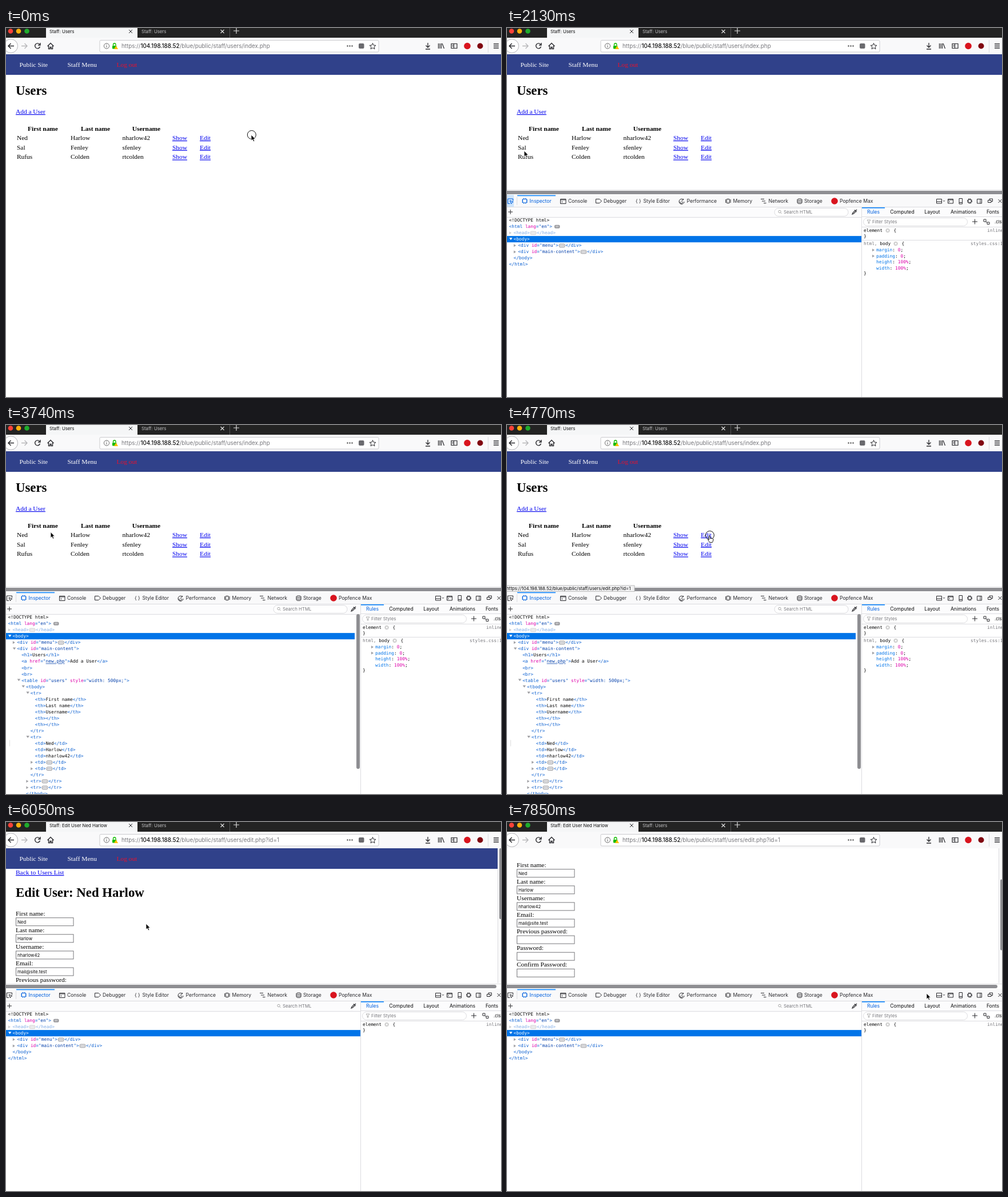
An HTML page that plays this animation: 866 px wide and 646 px high, repeating every 7.99 s.

```html
<!DOCTYPE html>
<html lang="en">
<head>
<meta charset="utf-8">
<title>Staff: Users</title>
<style>
  html, body { margin: 0; width: 100%; height: 100%; overflow: hidden; background: #fff; }
  svg { display: block; width: 866px; height: 646px; }
  text { white-space: pre; font: 8.6px Inter, "Open Sans", sans-serif; fill: #0c0c0d; }
  .s { font-size: 7.8px; }
  .grey { fill: #77777c; }
  .mid { text-anchor: middle; }
  .url { font-size: 9.85px; fill: #77777c; }
  .info { font-size: 9.4px; fill: #38383d; }
  .p { font: 11.4px "Liberation Serif", serif; fill: #000; }
  .b { font-weight: bold; }
  .h { font: bold 22.8px "Liberation Serif", serif; fill: #000; }
  .a { fill: #00e; text-decoration: underline; }
  .m { font: 7.83px "DejaVu Sans Mono", monospace; }
  .tab text { fill: currentColor; }
  .i { fill: none; }
  .i:not([stroke]) { stroke: currentColor; }
</style>
</head>
<body>
<svg id="stage" viewBox="0 0 866 646" color="#2a2a2e"></svg>
<script>
const T = (x, y, s, cls = '', more = '') => `<text x="${x}" y="${y}" class="${cls}" ${more}>${s}</text>`;
const R = (x, y, w, h, fill, more = '') => `<rect x="${x}" y="${y}" width="${w}" height="${h}" fill="${fill}" ${more}/>`;
const C = (x, y, r, fill, more = '') => `<circle cx="${x}" cy="${y}" r="${r}" fill="${fill}" ${more}/>`;
const P = (d, more = '') => `<path class="i" d="${d}" ${more}/>`;
const G = (id, s, more = '') => `<g id="${id}" ${more}>${s}</g>`;
const span = (fill, s, more = '') => `<tspan fill="${fill}" ${more}>${s}</tspan>`;
const BLUE = '#0074e8', PINK = '#dd00a9', LINE = '#dcdce0';
const CHAR = 4.714;

const users = [['Ned', 'Harlow', 'nharlow42'], ['Sal', 'Fenley', 'sfenley'], ['Rufus', 'Colden', 'rtcolden']];
const [first, last, login] = users[0];
const host = 'https://' + span('#0c0c0d', '104.198.188.52', 'font-weight="500"') + '/blue/public/staff/users/';

// browser window
const chrome = () =>
  R(0, 0, 866, 17, '#232323') + R(70, 0, 160, 17, '#f5f6f7') + R(0, 17, 866, 29, '#f9f9fa') +
  C(8, 5.5, 4.3, '#fc4138') + C(22, 5.5, 4.3, '#fdb00c') + C(36.5, 5.5, 4.3, '#1fac2c') +
  `<text id="title" x="76" y="9" class="s"></text>` + T(237, 9, 'Staff: Users', 's', 'style="fill:#c4c4c6"') +
  P('M215 3l6 6m0-6l-6 6') + P('M375.500 3l6 6m0-6l-6 6M403 0v10m-5-5h10', 'stroke="#ddd" stroke-width="1.200"') + P('M391.500 0v17', 'stroke="#555"') +
  C(8.5, 31.5, 12, '#fff', 'stroke="#b4b4b8"') + P('M14 31.500H4m4.500-4.500L4 31.500l4.500 4.500', 'stroke-width="1.500"') +
  P('M27 31.500h10m-4.500-4.500l4.500 4.500l-4.500 4.500', 'stroke="#b6b6b8" stroke-width="1.300"') +
  G('reload', P('M59 29a4.500 4.500 0 1 0 .5 3.500M60 26v4h-4', 'stroke-width="1.400"')) +
  G('stop', P('M51 27l8 8m0-8l-8 8', 'stroke-width="1.400"')) +
  P('M72.500 32l5.500-5.500l5.500 5.500M74.500 31v5.500h2.500v-3h2v3h2.500V31', 'stroke-width="1.400"') +
  R(164, 21.5, 488, 20.5, '#fff', 'rx="2" stroke="#cbcbce"') +
  C(176, 31.5, 4.6, 'none', 'stroke="#666"') + P('M176 30.500v3.500m0-5.500v1', 'stroke="#666"') +
  R(186, 31, 7.5, 5.5, '#12bc00', 'rx="1"') + P('M187.500 31v-2a2.200 2.200 0 0 1 4.500 0v2', 'stroke="#12bc00" stroke-width="1.300"') +
  `<path d="M192.500 31l3.500 6h-7z" fill="#ffbf00"/>` +
  `<text id="url" x="202" y="35" class="url"></text>` +
  [597.5, 601.5, 605.5].map(x => C(x, 31.5, 1.2, '#555')).join('') + R(617, 27, 9.5, 9, '#6a6a6e', 'rx="2"') +
  P('M641.500 26.500l1.500 3.600l4 .3l-3 2.600l1 3.900l-3.500-2.100l-3.500 2.100l1-3.900l-3-2.600l4-.3z') +
  P('M738 26v8m-3.500-3.500L738 34l3.500-3.500M734 37h8', 'stroke-width="1.300"') +
  P('M756.500 27v9m2.500-9v9m2.500-9v9m1.500-9l3.500 9', 'stroke-width="1.200"') +
  P('M779 27.500h10v8h-10zm4.500 0v8M780.500 30h2m-2 2h2', 'stroke-width="1.200"') +
  C(807, 31.5, 5.8, '#d9141e') + C(829.5, 31.5, 5, '#800610') +
  P('M843.500 21v22', `stroke="${LINE}"`) + P('M853 28h9m-9 3.500h9m-9 3.500h9', 'stroke-width="1.300"');

const menu = R(0, 46, 866, 36, '#30418a') +
  [[23.5, 'Public Site', '#fff'], [107.5, 'Staff Menu', '#fff'], [193.5, 'Log out', '#e8112d']]
    .map(([x, s, c]) => T(x, 68, s, 'p', `style="fill:${c}"`)).join('');

const listPage = () => menu + T(17, 117, 'Users', 'h') + T(17, 150, 'Add a User', 'p a') +
  [[64.5, 'First name'], [156.5, 'Last name'], [245.5, 'Username']].map(([x, s]) => T(x, 179.5, s, 'p b mid')).join('') +
  users.map((u, i) => [...u, 'Show', 'Edit'].map((s, j) =>
    T([19, 113, 203.5, 291, 339][j], 196 + i * 16.7, s, j > 2 ? 'p a' : 'p')).join('')).join('');

const editPage = () => menu + T(17, 92, 'Back to Users List', 'p a') + T(17, 131, `Edit User: ${first} ${last}`, 'h') +
  [['First name', first], ['Last name', last], ['Username', login], ['Email', 'mail@site.test'],
   ['Previous password', ''], ['Password', ''], ['Confirm Password', '']].map(([k, v], i) => {
    const y = 163.7 + i * 29.1;
    return T(17, y, k + ':', 'p') + R(17.5, y + 4, 100.5, 14, '#fff', 'stroke="#77777b"') + T(20, y + 14, v, 's');
  }).join('');

// developer tools
const tab = (x, s, icon, id = '') => `<g id="${id}" class="tab">${icon}${T(x, 306, s)}</g>`;
const toolbar = () =>
  R(0, 282, 866, 364, '#fff') + P('M0 283.500H866', `stroke="${LINE}"`) + R(0, 285, 0, 6, '#8e8e92', 'id="bar" rx="3"') +
  R(0, 292, 866, 21.5, '#f9f9fa') + R(18, 292, 67.5, 21, '#dedee1', 'id="hover"') + P('M0 313.500H866M17.500 296v14', `stroke="${LINE}"`) +
  G('picker', R(0, 292, 12, 21, '#cfe5fb', 'id="pickerBg"') + P('M5 307.500H1.500v-8.500h9v3.500M5 302l6 2.500l-2.500 1l-1 2.500z')) +
  R(0, 292.6, 67, 1.6, '#0a84ff', 'id="mark"') +
  tab(39.5, 'Inspector', P('M27.500 299.500h7v6.500h-7zM29.500 298v1.500m3-1.500v1.500m-3 6.500v1.500m3-1.500v1.500M26 301.500h1.500m-1.500 3h1.500m7-3h1.500m-1.500 3h1.500'), 'inspectorTab') +
  tab(107, 'Console', P('M93.500 299.500h9.500v8h-9.500zm0 1.500h9.500M95.500 303l1.500 1.500l-1.500 1.500')) +
  tab(169, 'Debugger', P('M155.500 299.500h6.500l3.500 3.500l-3.500 3.500h-6.500z')) +
  tab(238.5, 'Style Editor', T(225, 306, '{ }')) +
  tab(314.5, 'Performance', P('M309 301a4.500 4.500 0 1 0 1 3M305 304l4-5M303 304a2.200 2.200 0 1 0 4 0')) +
  tab(395.5, 'Memory', P('M384.500 299.500h4.500v7h-4.500zM382.500 300v6m8.500-6v6')) +
  tab(457.5, 'Network', P('M444 299.500h6m-4 3.500h6m-3 3.500h4.500'), 'networkTab') +
  tab(520, 'Storage', P('M508 300.500a4 1.500 0 0 1 8 0v5.500a4 1.500 0 0 1-8 0zm0 0a4 1.500 0 0 0 8 0m-8 3a4 1.500 0 0 0 8 0')) +
  tab(582, 'Popfence Max', C(573, 303, 5.8, '#d9141e')) +
  P('M751.500 299.500h9v7.500h-9zm0 4.500h9M763 302l1.500 1.500l1.500-1.500M771.500 299.500h9v7.500h-9zm0 1.500h9M773 302.500l1.500 1.500l-1.500 1.500M791 298.500h5.500v9.500H791zm0 7h5.500M822.500 299.500h8v7.500h-8zm5.500 0v7.500M841.500 301.500h5.500v4h-5.500zM844 301v-2h5.500v4.500H847M859.500 300l6 6m0-6l-6 6') +
  C(809.5, 303, 3.6, 'none', 'stroke="#3c3c40" stroke-width="1.800" stroke-dasharray="1.900 .9"') + C(809.5, 303, 2.8, 'none', 'stroke="#3c3c40"');

const pill = (x, y, w) => R(x, y, w, 14, '#fff', 'rx="7" stroke="#d2d2d6" stroke-width=".8"');
const funnel = (x, y) => P(`M${x} ${y}h6l-2.200 3v3h-1.600v-3z`, 'stroke="#999" stroke-width=".8"');

const network = () => R(0, 314, 866, 332, '#fff') + R(0, 314, 866, 36, '#fcfcfd') +
  P('M0 331.500H866M0 349.500H866M63.500 334v14m69-14v14m186.500-14v14m111-14v14m77-14v14m51.500-14v14m77-14v14m61-14v14', `stroke="${LINE}"`) +
  P('M4 319v7m4-7v7M21 319.500h8m-5-1.500h2M22.200 320l.5 6.500h4.800l.5-6.500m-4 1.500v3.500m2-3.500v3.500') +
  [['All', 45.5, 17], ['HTML', 71.5, 30], ['CSS', 100.5, 18], ['JS', 123, 15], ['XHR', 146, 24], ['Fonts', 174.5, 25],
   ['Images', 208, 33], ['Media', 242.5, 28], ['WS', 270, 19], ['Other', 297, 28]].map(([s, x, w], i) =>
    R(x - w / 2, 317, w, 11.5, i ? '#e7e7ea' : '#0a84ff', 'rx="2"') + T(x, 325.5, s, 's mid', i ? '' : 'style="fill:#fff"')).join('') +
  R(323, 318.5, 8, 8, '#0a6fe8', 'rx="1.500"') + P('M325 322.500l1.700 2l3-4', 'stroke="#fff"') + T(334, 325.5, 'Persist Logs', 's') +
  R(391.5, 318.5, 8, 8, '#fff', 'rx="1.500" stroke="#aaa"') + T(403, 325.5, 'Disable cache', 's') +
  pill(718, 315.5, 128) + funnel(725, 319.5) + T(734, 325.5, 'Filter URLs', 's grey') +
  P('M854.500 318.500h8.500v7.500h-8.500zm2.500 0v7.500m4-5.500l-2 2l2 2', 'stroke="#888"') +
  [['Status', 28.5], ['Method', 97.5], ['File', 225], ['Domain', 374], ['Cause', 468], ['Type', 532.5],
   ['Transferred', 597], ['Size', 666], ['Timeline', 781]].map(([s, x]) => T(x, 344, s, 's mid')).join('') +
  T(3, 371.5, '•', 'info') + T(10, 371.5, 'Perform a request or', 'info') +
  R(106, 357.5, 38.5, 21, '#ececee', 'rx="2" stroke="#dadade"') + T(125, 371.5, 'Reload', 'info mid') +
  T(148.5, 371.5, 'the page to see detailed information about network activity.', 'info') +
  T(3, 403, '•', 'info') + T(10, 403, 'Click on the', 'info') + R(66.5, 389, 24.5, 21, '#ececee', 'rx="2" stroke="#dadade"') +
  P('M82 397a4.500 4.500 0 1 0 1 3M78 400l4-5M76 400a2.200 2.200 0 1 0 4 0') + T(94.5, 403, 'button to start performance analysis.', 'info') +
  C(269.3, 400, 4.7, 'none', 'stroke="#222"') + T(269.3, 403, '?', 's b mid');

// markup tree: leading spaces give the depth, + and - the folding, … a folded body
const markup = s => s.replace(/</g, '&lt;').replace(/>/g, '&gt;').replace(/&lt;.*?&gt;/g, tag =>
  span('#0a5fd0', tag.replace(/ (\w+)="(.*?)"/g, (_, k, v) => ` ${span(PINK, k)}="` +
    span('#003eaa', v, k == 'href' ? 'text-decoration="underline"' : '') + '"')));

const tree = (text, width) => text.split('\n').map((row, i) => {
  const [, pad, fold, s] = row.match(/^( *)([+-]?)(.*)/);
  const x = 3.6 + pad.length * 7.85, y = 339.2 + i * 11.04, chosen = s == '<body>';
  const [head, tail] = s.split('…'), end = x + head.length * CHAR;
  let out = chosen ? R(0, y - 8.2, width, 11.1, BLUE) : '';
  if (fold) out += `<path d="M${x - 7.5} ${y - 5}${fold == '+' ? 'v5l4-2.500z' : 'h5.500l-2.750 4z'}" fill="${chosen ? '#fff' : '#a0a0a4'}"/>`;
  if (!i) out += T(x, y, '&lt;!DOCTYPE html&gt;', 'm', 'font-style="italic"');
  else if (chosen) out += T(x, y, '&lt;body&gt;', 'm b', 'style="fill:#fff"');
  else out += T(x, y, markup(head), 'm');
  if (tail) out += R(end + 1.5, y - 5.2, 9.5, 5.6, '#f2f2f4', 'rx="1.500" stroke="#77777a" stroke-width=".8"') +
    P(`M${end + 3.2} ${y - 2.4}h6.500`, 'stroke-dasharray="1 1.500"') + T(end + 12.2, y, markup(tail), 'm');
  if (s.startsWith('<html')) out += R(83, y - 5.5, 9.5, 6, '#9a9a9e', 'rx="2"') + T(87.7, y - .8, 'ev', 'mid', 'style="fill:#fff;font-size:5px"');
  return s.startsWith('<head') ? `<g opacity=".5">${out}</g>` : out;
}).join('');

const top4 = `<!DOCTYPE html>
<html lang="en">
 +<head>…</head>
 -<body>
  +<div id="menu">…</div>`;
const folded = `${top4}
  +<div id="main-content">…</div>
 </body>
</html>`;
const cells = (tag, list) => list.map(s => `      <${tag}>${s}</${tag}>`).join('\n');
const unfolded = `${top4}
  -<div id="main-content">
   <h1>Users</h1>
   <a href="new.php">Add a User</a>
   <br>
   <br>
   -<table id="users" style="width: 500px;">
    -<tbody>
     -<tr>
${cells('th', ['First name', 'Last name', 'Username', '', ''])}
     </tr>
     -<tr>
${cells('td', users[0])}
      +<td>…</td>
      +<td>…</td>
     </tr>
     +<tr>…</tr>
     +<tr>…</tr>
    </tbody>`;

const target = (x, y) => P(`M${x - 2.5} ${y - 2.5}h5v5h-5zm2.500-1v2m0 3v2m-3.500-3.500h2m3 0h2`, 'stroke="#aaa" stroke-width=".8"');
const inspector = () => R(0, 314, 866, 332, '#fff') + R(0, 314, 866, 17, '#fcfcfd') +
  P('M0 331.500H620M620.500 314V646M621 330.500H866M621 348.500H866', `stroke="${LINE}"`) +
  P('M2 322h8m-4-4v8') + G('searchBox', pill(468, 315.5, 129)) + C(477, 321.5, 2.2, 'none', 'stroke="#aaa"') +
  P('M478.700 323.200l2 2', 'stroke="#aaa"') + T(484, 325.3, 'Search HTML', 's grey') +
  P('M604 326l1-2.500l4-4l1.500 1.500l-4 4zM608 318.500l3.500 3.500M610 320l2-2', 'stroke-width="1.200"') +
  R(621, 314, 40, 1.6, '#0a84ff') +
  [['Rules', 641], ['Computed', 691.5], ['Layout', 744], ['Animations', 798.5], ['Fonts', 850]]
    .map(([s, x], i) => T(x, 325.2, s, 'mid', i ? '' : 'style="fill:#0060df"')).join('') +
  pill(623.5, 332.5, 182) + funnel(630, 336) + T(639, 342.2, 'Filter Styles', 's grey') +
  P('M814 339h9m-4.500-4.500v9M834 335h4v4h-4zm4 4l2 2M840 340h4v3.500h-4z') + T(853, 342, '.cls', 's') +
  T(624, 357, 'element', 'm') + target(666, 354.5) + T(676.5, 357, '{', 'm') + T(840, 357, 'inline', 'm grey') + T(624, 366.5, '}', 'm') +
  G('rules', P('M621 371.500H866', `stroke="${LINE}"`) + T(624, 380, span('#77777c', 'html, ') + 'body', 'm') + target(680, 377.5) +
    T(690.5, 380, '{', 'm') + T(811, 380, 'styles.css:1', 'm grey') +
    ['margin: 0', 'padding: 0', 'height: 100%', 'width: 100%'].map((s, i) => {
      const [k, v] = s.split(': '), y = 391.3 + i * 10.4;
      return (i < 2 ? `<path d="M639 ${y - 5}v5l4-2.500z" fill="#a0a0a4"/>` : '') + T(646, y, `${span(BLUE, k)}: ${span(PINK, v)};`, 'm');
    }).join('') + T(624, 432, '}', 'm')) +
  G('folded', tree(folded, 620)) +
  G('unfolded', tree(unfolded, 610) + R(613, 331, 6, 271, '#8e8e92', 'rx="3"') + R(6, 0, 1, 11, '#ddd', 'id="gutter"'));

const overlay = (id, x, y, w, h, tag, size, tipW) => {
  const mid = x + w / 2, left = mid - tipW / 2, tw = tag.length * 4.6 + 8;
  return G(id, R(x, y, w, h, '#6fc3e8', 'opacity=".55"') +
    P(`M${x} 46V283M${x + w} 46V283M0 ${y}H866M0 ${y + h}H866`, 'stroke="#3d9bd6" stroke-dasharray="4 2"') +
    R(left, y - 24.7, tipW, 17.7, '#38383d', 'rx="2"') + `<path d="M${mid - 5} ${y - 7.2}h10l-5 4.500z" fill="#38383d"/>` +
    T(left + 4, y - 13, tag, 's', 'style="fill:#d58bff"') + P(`M${left + tw} ${y - 20}v9`, 'stroke="#66666a"') +
    T(left + tw + 4.5, y - 13, size, 's', 'style="fill:#fff;font-size:7.6px"'));
};

const cursor = () => G('cursor',
  C(.8, 0, 7.5, 'none', 'id="ring" stroke="#111"') +
  G('arrow', '<path d="M0 0v10.200l2.300-2.100l1.700 3.700l1.800-.8l-1.700-3.600h3.100z" fill="#000" stroke="#fff" stroke-width=".8"/>') +
  G('hand', '<path d="M-1 1.500q1.200-1.200 2 0l.7 4q4-1 5.300 1.300l-.7 3.700l-1 2h-4.600l-3.200-4.600q.2-1.500 2-.3z" fill="#fff" stroke="#000" stroke-width=".9"/>'));

const $ = id => document.getElementById(id);
$('stage').innerHTML = '<clipPath id="view"><path d="M0 46H866V646H0z"/></clipPath>' + R(0, 0, 866, 646, '#fff') +
  G('pages', G('list', listPage()) + G('edit', editPage()), 'clip-path="url(#view)"') +
  G('scrollbar', R(860.5, 46, 6, 238, '#fafafa') + P('M860.500 46V283', `stroke="${LINE}"`) + R(863, 46, 5, 124, '#8e8e92', 'rx="2" id="thumb"')) +
  chrome() +
  overlay('tableBox', 17, 168, 351, 66, 'table', '500 × 94.4', 78) +
  overlay('thBox', 19, 169.7, 90.5, 13.5, 'th', '129.017 × 21.2', 77) +
  overlay('tdBox', 19, 186, 90.5, 13.5, 'td', '129.017 × 21.2', 77) +
  G('tools', toolbar() + G('network', network()) + G('inspector', inspector())) +
  G('status', R(-1, 281, 224, 10.5, '#f2f2f3', 'stroke="#bbb"') + T(-1, 289.3, 'https://104.198.188.52/blue/public/staff/users/edit.php?id=1', 's')) +
  cursor();

// fraction done of a motion in n equal steps, the first at a, the last at b
const steps = (t, a, b, n) => t < a ? 0 : t >= b ? 1 : (Math.floor((t - a) / (b - a) * (n - 1) + 1e-6) + 1) / n;
const ease = p => p * p * (3 - 2 * p);
const moves = [ // start, end, steps, x, y
  [450, 1240, 6, 27, 306], [1690, 1690, 1, 6, 303], [1980, 2130, 2, 30, 215], [2310, 2630, 3, 58, 178],
  [2960, 2960, 1, 56, 187], [3710, 4470, 6, 354, 193], [5900, 6050, 2, 245, 178], [7550, 7850, 3, 734, 300]];
const clicks = [[0, 150], [1390, 1540], [1840, 1980], [4770, 4910]];

function draw(t) {
  const within = (a, b) => t >= a && t < b;
  const show = (id, on) => $(id).style.display = on ? '' : 'none';
  const inspect = t >= 1540, loaded = t >= 5210, grown = within(2310, 5360);
  const scroll = 73.5 * steps(t, 6350, 6650, 3) + 11.5 * steps(t, 6950, 7100, 2);

  let x = 429, y = 187;
  for (const [a, b, n, x1, y1] of moves) {
    const p = ease(steps(t, a, b, n));
    x += (x1 - x) * p;
    y += (y1 - y) * p;
  }
  $('cursor').setAttribute('transform', `translate(${x} ${y})`);
  const link = within(4470, 5210);
  show('hand', link);
  show('arrow', !link);
  show('ring', clicks.some(c => within(...c)));

  show('list', !loaded);
  show('edit', loaded);
  show('scrollbar', loaded);
  $('edit').setAttribute('transform', `translate(0 ${-scroll})`);
  $('thumb').setAttribute('y', 46 + scroll * .64);
  $('title').textContent = loaded ? `Staff: Edit User ${first} ${last}` : 'Staff: Users';
  $('url').innerHTML = host + (loaded ? 'edit.php?id=1' : 'index.php');
  show('stop', within(5060, 5900));
  show('reload', !within(5060, 5900));

  show('tools', t >= 300);
  show('network', !inspect);
  show('inspector', inspect);
  show('hover', within(1240, 1540));
  show('pickerBg', within(1840, 3560));
  $('picker').style.color = within(1840, 3560) ? '#0060df' : '';
  $('inspectorTab').style.color = inspect ? '#0060df' : '';
  $('networkTab').style.color = inspect ? '' : '#0060df';
  $('mark').setAttribute('x', inspect ? 18 : 436);
  $('mark').setAttribute('width', inspect ? 67 : 63);
  $('bar').setAttribute('x', -5);
  $('bar').setAttribute('width', loaded ? 863 : 880);

  show('folded', !grown && !within(5360, 5600));
  show('unfolded', grown);
  show('searchBox', t < 5360);
  show('rules', t < 5360);
  $('gutter').setAttribute('y', t < 3110 ? 474 : 551.5);
  show('tableBox', within(2310, 2480));
  show('thBox', within(2480, 3110));
  show('tdBox', within(3110, 3560));
  show('status', link);
}

const frame = now => {
  draw(now % 7990);
  requestAnimationFrame(frame);
};
draw(0);
requestAnimationFrame(frame);
</script>
</body>
</html>
```
